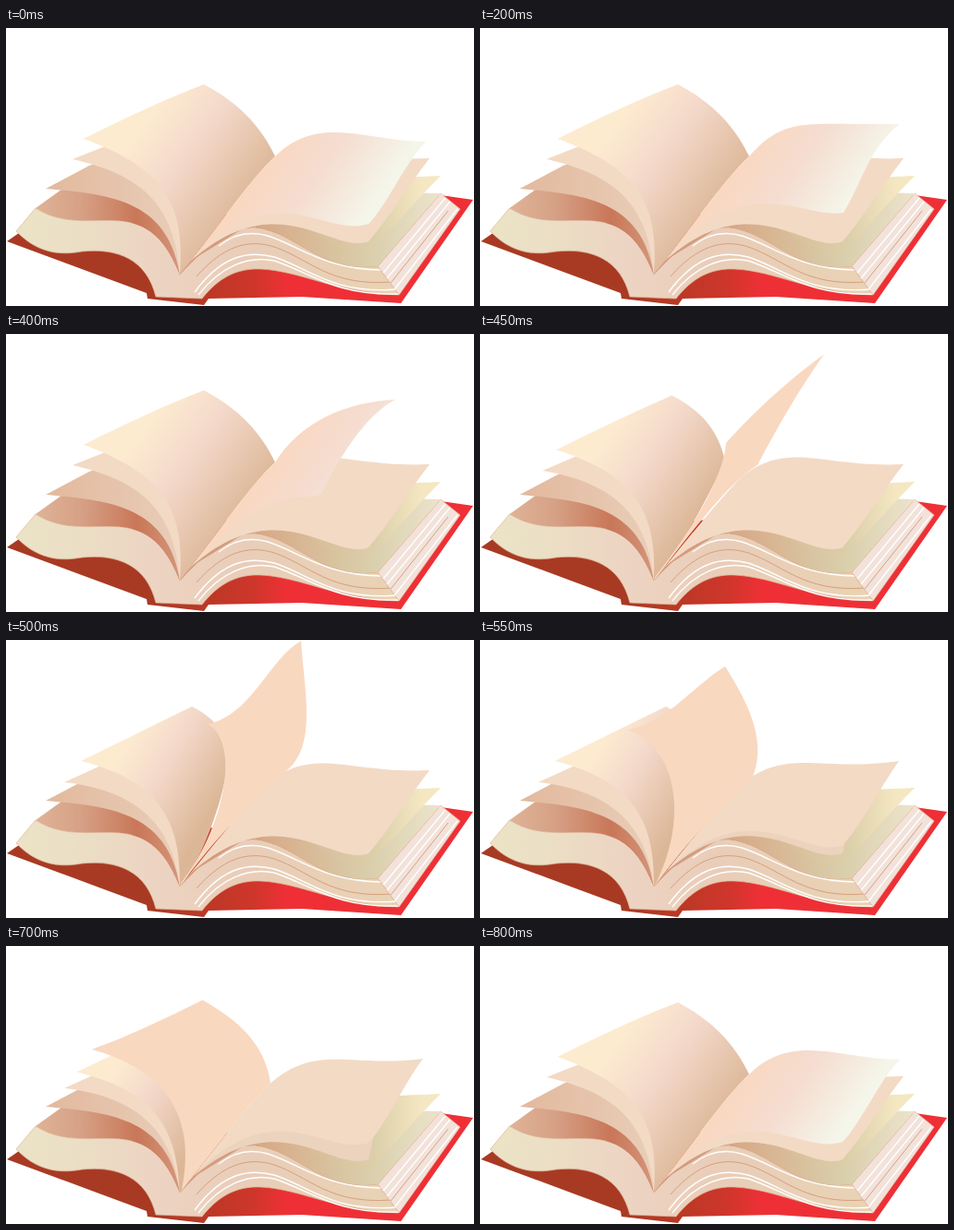
An HTML page for the animation above (5800 ms loop, 506x301 px).

```html
<!DOCTYPE html>
<html lang="en">
<head>
<meta charset="utf-8">
<title>Book</title>
<style>
  html, body { margin: 0; height: 100%; overflow: hidden; background: #fff; }
  svg { display: block; width: 100vw; height: 100vh; }
  .line { fill: none; stroke: #fff; stroke-width: 1.4; }
  .thin { fill: none; stroke: #d39a78; stroke-width: .9; }
</style>
</head>
<body>
<svg viewBox="0 0 506 301" preserveAspectRatio="none">
  <defs>
    <linearGradient id="cover" gradientUnits="userSpaceOnUse" x1="0" x2="506">
      <stop offset=".3" stop-color="#a83a23"/>
      <stop offset=".44" stop-color="#bd3826"/>
      <stop offset=".53" stop-color="#cf362b"/>
      <stop offset=".6" stop-color="#ee3036"/>
    </linearGradient>
    <linearGradient id="block" gradientUnits="userSpaceOnUse" x1="11" x2="425">
      <stop offset="0" stop-color="#ece3c6"/>
      <stop offset=".15" stop-color="#ebdfc5"/>
      <stop offset=".37" stop-color="#edd3c2"/>
      <stop offset=".6" stop-color="#e9cdb8"/>
      <stop offset="1" stop-color="#e9d3b4"/>
    </linearGradient>
    <linearGradient id="shade" gradientUnits="userSpaceOnUse" x1="35" x2="187">
      <stop offset="0" stop-color="#deb296"/>
      <stop offset=".3" stop-color="#d6a186"/>
      <stop offset=".7" stop-color="#c97758"/>
      <stop offset="1" stop-color="#d4957a"/>
    </linearGradient>
    <linearGradient id="third" gradientUnits="userSpaceOnUse" x1="43" x2="187">
      <stop offset="0" stop-color="#e2b99d"/>
      <stop offset="1" stop-color="#e9cdb8"/>
    </linearGradient>
    <linearGradient id="stack" gradientUnits="userSpaceOnUse" x1="230" x2="465">
      <stop offset="0" stop-color="#d39a7b"/>
      <stop offset=".35" stop-color="#d8b592"/>
      <stop offset=".7" stop-color="#d9cfac"/>
      <stop offset="1" stop-color="#ebe2ca"/>
    </linearGradient>
    <linearGradient id="yellow" gradientUnits="userSpaceOnUse" x1="240" x2="450">
      <stop offset="0" stop-color="#d49c7e"/>
      <stop offset=".4" stop-color="#d9bb98"/>
      <stop offset=".75" stop-color="#dbcfaa"/>
      <stop offset="1" stop-color="#f4e7c2"/>
    </linearGradient>
    <linearGradient id="cream" x1=".15" y1=".1" x2=".9" y2=".65">
      <stop offset=".2" stop-color="#fdebd0"/>
      <stop offset=".5" stop-color="#f4d9cb"/>
      <stop offset=".95" stop-color="#dcb797"/>
    </linearGradient>
    <linearGradient id="pale" gradientUnits="userSpaceOnUse" x1="300" y1="120" x2="400" y2="190">
      <stop offset="0" stop-color="#f9d8c1"/>
      <stop offset=".45" stop-color="#f5ddd1"/>
      <stop offset="1" stop-color="#f5f6ea"/>
    </linearGradient>
  </defs>

  <path fill="url(#cover)" d="M1,231 L14,222 L470,181 L505,186 L427,298 L320,291 L219,293 L214,300 L153,293 L152,287 Z"/>
  <path fill="url(#block)" stroke="#dcb795" stroke-width=".7" d="M32,195 L11,220 C35,245 60,246 82,242 C120,238 152,250 162,291 L212,293 C230,270 250,260 275,261 C320,263 355,287 425,289 L402,258 C345,266 320,228 280,218 C250,210 225,227 188,267 C150,170 90,232 32,195 Z"/>
  <path class="line" d="M230,236 C245,224 262,219 283,225 C318,236 345,262 408,262"/>
  <path class="thin" d="M206,269 C235,236 262,228 290,237 C328,250 350,280 416,275"/>
  <path class="line" d="M204,286 C232,248 260,240 290,248 C328,260 352,288 422,283"/>
  <path class="line" d="M208,289 C232,258 262,246 290,252 C330,265 355,290 424,288"/>

  <path fill="#f2e2da" stroke="#e3b99c" stroke-width=".7" d="M402,258 L470,179 L491,196 L425,289 Z"/>
  <path class="line" d="M408,265 L475,184 M412,271 L480,188 M420,283 L488,196"/>
  <path class="thin" d="M416,276 L478,198"/>

  <path fill="url(#stack)" d="M188,267 L230,215 L420,178 L470,179 L402,258 C345,266 320,228 280,218 C250,210 225,227 188,267 Z"/>
  <path fill="url(#yellow)" d="M200,252 L300,190 L425,162 L470,160 C440,190 415,220 392,243 C350,248 330,205 270,203 C250,205 230,220 200,252 Z"/>
  <path fill="#ecd3bd" d="M190,264 L275,168 L400,195 L392,231 C352,246 295,168 200,252 Z"/>
  <path id="under" fill="#f3dac5"/>

  <path fill="url(#shade)" d="M32,195 L64,172 L150,160 L215,180 L188,267 C150,170 90,232 32,195 Z"/>
  <path fill="url(#third)" d="M43,174 L90,149 L140,130 L215,160 L188,267 C175,185 110,180 43,174 Z"/>
  <path id="second" fill="#f3dac5"/>
  <path id="top" fill="url(#cream)"/>
  <path id="leaf"/>
</svg>
<script>
const LOOP = 5800, END = 800;
const steps = [0, 200, 300, 400, 450, 500, 550, 600, 700, 800];

const flatRight = "M188,267 C230,215 262,166 291,139 C338,92 390,123 454,123 C432,145 410,195 392,212 C345,228 290,155 200,252 Z";
const flatLeft = "M188,267 C230,215 262,166 291,139 C275,105 250,80 214,61 C170,78 127,98 84,120 C165,150 195,185 188,267 Z";
const pushedLeft = "M188,267 C205,250 235,180 239,135 C240,105 232,88 201,72 C161,92 121,111 81,131 C155,150 190,185 188,267 Z";
const underRest = "M188,267 C230,215 262,175 285,153 C335,115 370,145 458,141 C435,170 415,205 392,231 C352,246 295,168 200,252 Z";
const secondRest = "M72,142 L130,119 L215,160 L188,267 C182,185 140,158 72,142 Z";
const secondPushed = "M63,154 L140,119 L215,160 L188,267 C180,195 135,162 63,154 Z";

// Each part: [time, outline] pairs
const tracks = {
  leaf: [
    [0, flatRight],
    [200, "M188,267 C230,215 262,166 291,139 C330,95 350,105 454,104 C420,130 412,170 393,200 C350,208 290,148 200,252 Z"],
    [300, "M188,267 C230,215 262,166 291,139 C340,85 390,85 450,79 C430,105 402,142 381,174 C330,178 300,150 200,252 Z"],
    [400, "M188,267 C230,215 262,166 291,139 C318,96 365,74 421,71 C385,90 358,140 340,174 C310,182 290,160 200,252 Z"],
    [450, "M188,267 C232,210 268,162 300,142 C322,100 345,60 372,22 C340,45 300,80 266,118 C264,150 235,205 190,262 Z"],
    [500, "M188,267 C240,195 290,155 310,135 C335,105 322,50 319,1 C285,20 265,82 218,91 C255,112 235,205 190,262 Z"],
    [600, "M188,267 C230,215 262,175 281,158 C286,110 255,82 211,56 C180,76 140,97 101,104 C160,112 222,165 192,262 Z"],
    [END, flatLeft]
  ],
  top: [
    [0, flatLeft], [400, flatLeft], [500, pushedLeft], [600, pushedLeft],
    [END, "M188,267 C205,250 230,190 234,145 C235,115 225,100 190,88 C150,104 111,124 72,142 C140,158 182,185 187,267 Z"]
  ],
  second: [[0, secondRest], [400, secondRest], [500, secondPushed], [END, secondPushed]],
  under: [
    [0, underRest], [500, underRest],
    [600, "M188,267 C230,215 262,175 281,158 C335,117 360,142 448,121 C430,150 410,195 392,214 C345,228 290,155 200,252 Z"],
    [END, flatRight]
  ]
};

function mix(a, b, k) {
  const target = b.match(/\d+/g);
  let i = 0;
  return a.replace(/\d+/g, n => +n + (target[i++] - n) * k);
}

function outline(track, t) {
  const i = Math.max(1, track.findIndex(key => key[0] >= t));
  const [t0, a] = track[i - 1], [t1, b] = track[i];
  return mix(a, b, (t - t0) / (t1 - t0));
}

const parts = Object.keys(tracks).map(id => [document.getElementById(id), tracks[id]]);
const leaf = document.getElementById("leaf");

function draw(now) {
  const t = steps.findLast(s => s <= now % LOOP) % END;
  for (const [path, track] of parts) path.setAttribute("d", outline(track, t));
  leaf.setAttribute("fill", t < 450 ? "url(#pale)" : "#f9d8c0");
  requestAnimationFrame(() => draw(performance.now() - start));
}

const start = performance.now();
draw(0);
</script>
</body>
</html>
```
